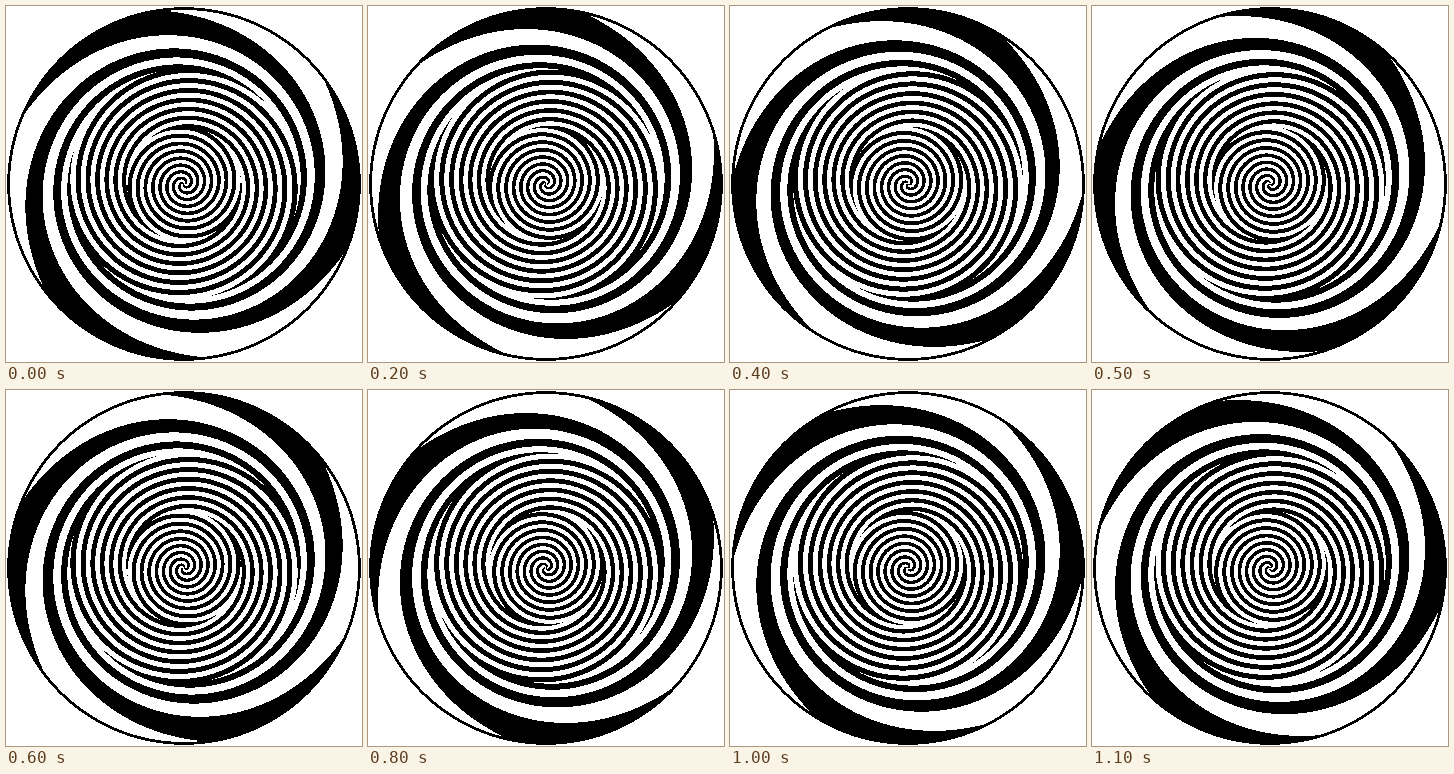
These frames come from a looping animation (356 by 356 pixels, 1.2 s). An HTML page with a canvas:

```html
<!DOCTYPE html>
<html lang="en">
<head>
<meta charset="utf-8">
<title>Spiral disc</title>
<style>
  html, body { margin: 0; width: 100%; height: 100%; overflow: hidden; background: #fff; }
  canvas { display: block; width: 356px; height: 356px; }
</style>
</head>
<body>
<canvas id="disc" width="356" height="356"></canvas>
<script>
const SIZE = 356, CENTER = 178, RADIUS = 176.8, RIM = 174;
const ARM = 120;            // degrees between the three arms
const STEP_MS = 100, STEPS = 12;
const START = 141;          // where an arm leaves the rim at time zero

// Rings from the rim inward; the winding direction alternates.
// twist: degrees wound after d pixels from the ring's outer edge.
const rings = [
  { outer: 176, inner: 115, dir: 1, twist: d => 44.6 * Math.expm1(d / 30) },
  { outer: 115, inner: 57, dir: -1, twist: d => 11.4 * d + 0.025 * d * d },
  { outer: 57, inner: 0, dir: 1, twist: d => 14.2 * d + 0.042 * d * d }
];

function winding(r) {
  let sum = 0;
  for (const ring of rings) {
    const d = Math.max(0, ring.outer - Math.max(r, ring.inner));
    sum += ring.dir * ring.twist(d);
  }
  return sum;
}

const mod = (a, n) => ((a % n) + n) % n;
const ctx = document.getElementById("disc").getContext("2d");
const image = ctx.createImageData(SIZE, SIZE);
const pixels = new Uint32Array(image.data.buffer);
const BLACK = 0xff000000, WHITE = 0xffffffff;

// Phase of each pixel within its arm; -1 is outside, -2 is the rim line.
const phase = new Float32Array(SIZE * SIZE);
for (let i = 0; i < phase.length; i++) {
  const x = i % SIZE + 0.5 - CENTER;
  const y = Math.floor(i / SIZE) + 0.5 - CENTER;
  const r = Math.hypot(x, y);
  const angle = Math.atan2(y, x) * 180 / Math.PI;
  phase[i] = r > RADIUS ? -1 : r > RIM ? -2 : mod(angle - START - winding(r), ARM);
}

function draw(step) {
  const turn = step * ARM / STEPS;
  for (let i = 0; i < phase.length; i++) {
    const p = phase[i];
    const dark = p === -2 || (p >= 0 && mod(p - turn, ARM) >= ARM / 2);
    pixels[i] = dark ? BLACK : WHITE;
  }
  ctx.putImageData(image, 0, 0);
}

const begin = performance.now();
let shown = -1;
function tick() {
  const step = Math.floor((performance.now() - begin) / STEP_MS) % STEPS;
  if (step !== shown) draw(shown = step);
  requestAnimationFrame(tick);
}
tick();
</script>
</body>
</html>
```
